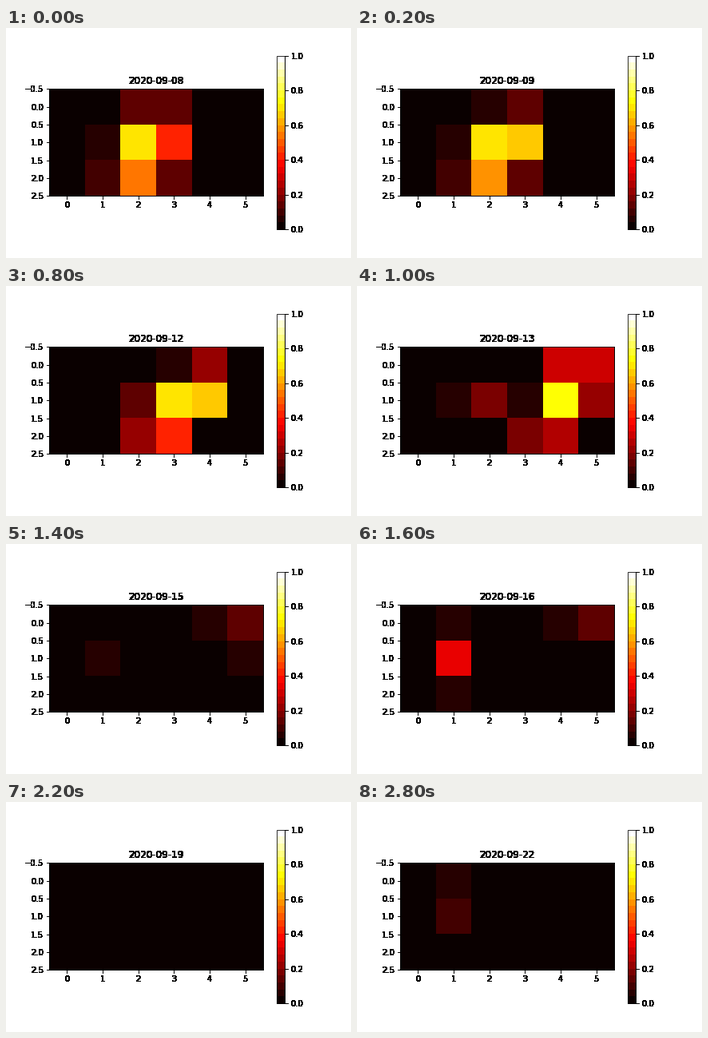
Recreate the animation shown at these times as a matplotlib script. Size 432x288 px, loop 3800 ms.

```python
import numpy as np
import matplotlib.pyplot as plt
from matplotlib.animation import FuncAnimation

LEVELS = 24
STEP_MS = 200
LOOP_MS = 3800
FIRST_DAY, LAST_DAY = 8, 22

# Each grid row holds one hump that drifts right and fades by the last key day.
KEY_DAYS = [0, 3, 5, 7, 9, 10]
HUMPS = [
    dict(peak=[3.5, 2.4, 8, 3.5, 2.4, 0],
         center=[2.5, 3.3, 4.5, 4.9, 4.8], width=[0.9]),
    dict(peak=[17.2, 15.8, 17.6, 1.4, 0],
         center=[2.2, 2.8, 4.1, 5.2], width=[0.94, 1.5, 0.85, 0.8]),
    dict(peak=[13.2, 14.3, 6.3, 0],
         center=[2.04, 2, 3.7, 4], width=[0.9]),
]
COLS = np.arange(6)
ROWS = np.arange(3)[:, None]


def between_keys(day, values):
    return np.interp(day, KEY_DAYS[:len(values)], values)


def hump(day, keys):
    peak, center, width = (between_keys(day, keys[k])
                           for k in ("peak", "center", "width"))
    return peak * np.exp(-((COLS - center) / width) ** 4)


def left_spot(day):
    """A small round spot that settles on column 1 and flares twice."""
    peak = np.interp(day, [3, 5, 7, 9, 11, 12, 14],
                     [0, 5.1, 1.4, 15.3, 0, 0, 2.8])
    col = np.interp(day, [5, 7, 9], [1.75, 1, 0.95])
    row = np.interp(day, [9, 14], [1, 0.7])
    return peak * np.exp(-2.8 * (COLS - col) ** 2 - 2 * (ROWS - row) ** 2)


def day_grid(day):
    rows = np.array([hump(day, keys) for keys in HUMPS])
    return (rows + left_spot(day)) / LEVELS


def drop_alpha(img, dpi):
    """Make every touched pixel opaque, which gives heavy hard-edged text."""
    out = np.rint(img * 255).astype(np.uint8)
    out[..., 3] = np.where(out[..., 3] > 0, 255, 0)
    return out, 0, 0


plt.rcParams.update({"font.family": "DejaVu Sans", "font.size": 10,
                     "text.kerning_factor": 6})
fig, ax = plt.subplots(figsize=(6, 4), dpi=72, facecolor="white")
fig.subplots_adjust(left=0.125, right=0.9, bottom=0.125, top=0.88)

heat = ax.imshow(day_grid(0), vmin=0, vmax=1,
                 cmap=plt.get_cmap("hot", LEVELS + 1))
bar = fig.colorbar(heat, ax=ax)
title = ax.set_title("")
ax.set_xticks(COLS)
ax.set_yticks(np.arange(-0.5, 2.6, 0.5))

for axes in (ax, bar.ax):
    axes.set_agg_filter(drop_alpha)


def update(frame):
    day = min(frame, LAST_DAY - FIRST_DAY)
    heat.set_data(day_grid(day))
    title.set_text(f"2020-09-{FIRST_DAY + day:02d}")
    return heat, title


anim = FuncAnimation(fig, update, frames=LOOP_MS // STEP_MS,
                     interval=STEP_MS, repeat=True)
plt.show()
```
